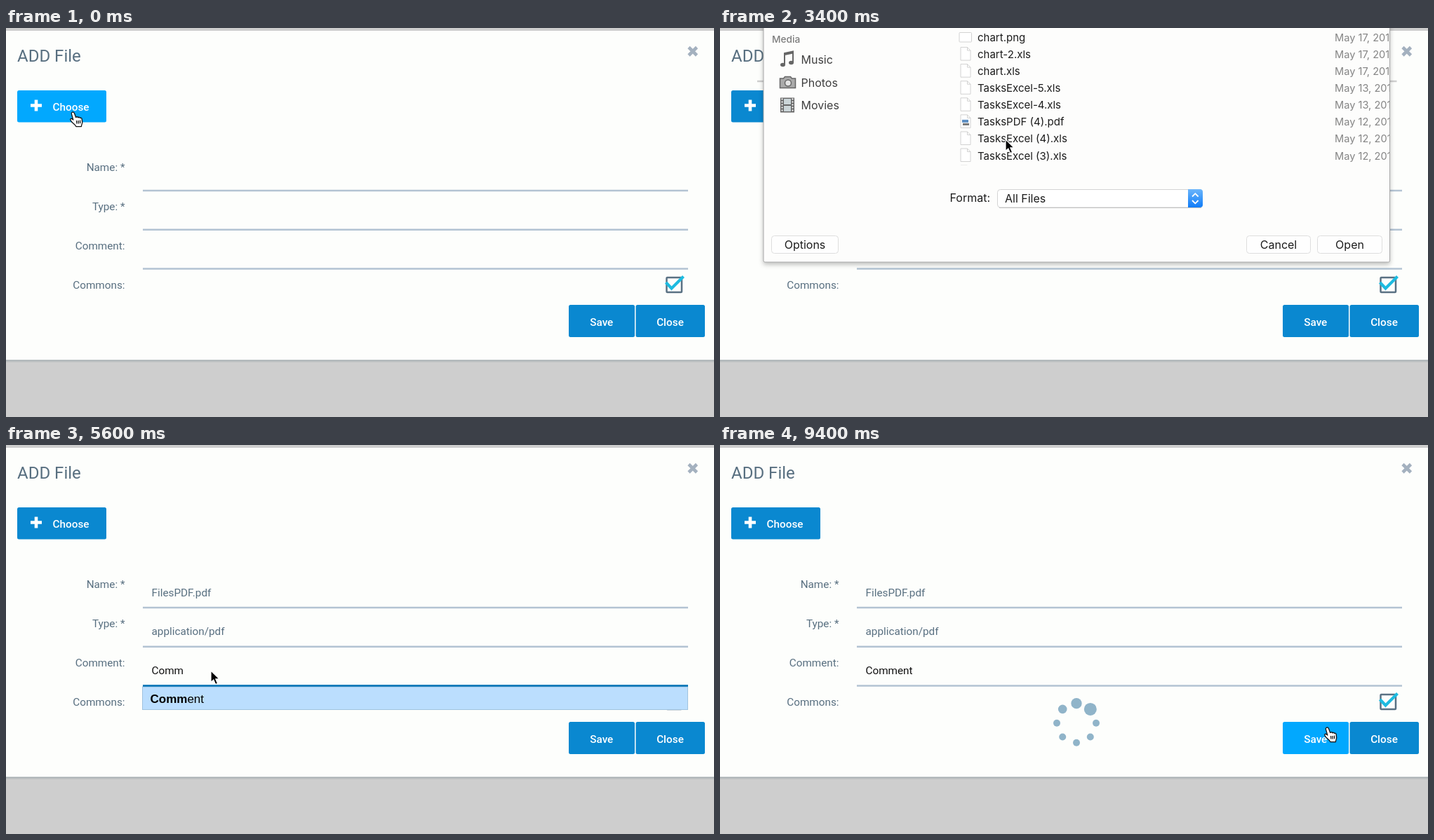
An HTML page for the animation above (9.6 s loop, 1009x555 px).

```html
<!DOCTYPE html>
<html lang="en">
<head>
<meta charset="utf-8">
<title>Add file</title>
<style>
html, body { margin: 0; width: 100%; height: 100%; overflow: hidden; background: #cecece; }
svg { display: block; width: 100%; height: 100%; }
text { white-space: pre; }
.form { font: 15.3px Roboto, sans-serif; fill: #586f80; }
.label { text-anchor: end; }
.btn { font-weight: 500; fill: #fff; text-anchor: middle; }
.line { stroke: #b3c3d3; stroke-width: 2.5; }
.mac { font: 16px Inter, sans-serif; fill: #1c1c1c; }
.side { fill: #3f3f3f; }
.head { font-size: 13.7px; font-weight: 500; fill: #7d7d7d; }
.file { font-size: 15px; }
.date { font-size: 14.6px; fill: #858585; }
.mid { text-anchor: middle; }
.box { fill: #fefefe; stroke: #dedede; }
.ico { fill: none; stroke: #5c5c5c; stroke-width: 1.4; }
.pale { fill: none; stroke: #b4b4b4; stroke-width: 1.6; }
.doc { fill: #fff; stroke: #d2d2d2; }
</style>
</head>
<body>
<svg viewBox="0 0 1009 555" preserveAspectRatio="none">
  <defs>
    <clipPath id="pane"><path d="M62 -20H954.500V551H62z"/></clipPath>
    <clipPath id="rows"><path d="M306 71H954.500V413H306z"/></clipPath>
    <linearGradient id="blue" x2="0" y2="1"><stop stop-color="#6bb5fb"/><stop offset="1" stop-color="#0f7cf8"/></linearGradient>
  </defs>

  <rect width="1009" height="555" fill="#cecece"/>
  <rect y="474" width="1009" height="3" fill="#bfc2c3"/>
  <rect y="4" width="1009" height="470" fill="#fdfefc"/>
  <rect y="473.500" width="1009" height="1.500" fill="#a5adb1"/>

  <g class="form">
    <text x="16" y="48" font-size="24">ADD File</text>
    <path d="M973 27.500L984.500 39M984.500 27.500L973 39" stroke="#a4b1bf" stroke-width="4.600"/>
    <rect id="choose" x="16" y="89" width="127" height="45.500" rx="2.500"/>
    <path d="M35 110.500H51M43 102.500V118.500" stroke="#fff" stroke-width="4.600"/>
    <text class="btn" x="92.500" y="118">Choose</text>
    <g class="label">
      <text x="169.500" y="204">Name: *</text>
      <text x="169.500" y="260">Type: *</text>
      <text x="169.500" y="315.500">Comment:</text>
      <text x="169.500" y="371.500">Commons:</text>
    </g>
    <path class="line" id="nameLine" d="M195 232H972"/>
    <path class="line" id="typeLine" d="M195 287.700H972"/>
    <path class="line" id="noteLine" d="M195 343.500H972"/>
    <text id="name" x="207.500" y="215.500">FilesPDF.pdf</text>
    <text id="type" x="207.500" y="271">application/pdf</text>
    <text id="note" x="207.500" y="327" fill="#111"></text>
    <rect x="941.500" y="356" width="21.500" height="21" fill="none" stroke="#5a7183" stroke-width="2.500" rx="1"/>
    <path d="M940.500 363L948.500 371.500L965.500 354.500" fill="none" stroke="#1dbbe0" stroke-width="4.200"/>
    <rect id="save" x="802" y="395" width="94" height="46" rx="2.500"/>
    <text class="btn" x="848.800" y="424.500">Save</text>
    <rect x="897.500" y="395" width="98.500" height="46" rx="2.500" fill="#0a88d0"/>
    <text class="btn" x="946.500" y="424.500">Close</text>
  </g>

  <g id="hint">
    <rect x="194.500" y="345" width="777" height="32.500" fill="#bbdefe" stroke="#a0c3df"/>
    <path d="M195 343.500H972" stroke="#0b78b8" stroke-width="2.500"/>
    <text x="205.500" y="368" font-family="Liberation Sans, Arial, sans-serif" font-size="17"><tspan id="match" font-weight="700"></tspan><tspan id="rest"></tspan></text>
  </g>

  <g id="spinner" fill="#90b4c9"></g>

  <path id="slot" d="M53 76H964.500" stroke="#cfcfcf" stroke-width="2.500"/>
  <g id="dialog" class="mac">
    <rect x="62" y="-20" width="892.500" height="571" rx="2" fill="#fdfdfc" stroke="#a9a9a9" style="filter: drop-shadow(0 3px 3px rgba(0,0,0,.25))"/>
    <g id="content" clip-path="url(#pane)">
      <g id="bar"></g>
      <path class="ico" d="M89.500 10h18.500v13.500h-18.500zM95 10v13.500M91 13h2.500M91 16h2.500M91 19h2.500"/>
      <path class="pale" d="M155 10.500l-7 6.500l7 6.500M183 10.500l7 6.500l-7 6.500"/>
      <path fill="#5c5c5c" d="M224 10h5v5h-5zM232 10h5v5h-5zM224 18h5v5h-5zM232 18h5v5h-5z"/>
      <rect x="247" y="4" width="34" height="27" fill="#6c6c6c"/>
      <path stroke="#fff" stroke-width="1.500" d="M254.500 11h18M254.500 15h18M254.500 19h18M254.500 23h18"/>
      <path class="ico" d="M287.500 10.500h18.500v12.500h-18.500zM293.500 10.500v12.500M300 10.500v12.500"/>
      <path fill="#5c5c5c" d="M334 10h5v4h-5zM341 10h5v4h-5zM348 10h5v4h-5zM334 15.500h5v3h-5zM341 15.500h5v3h-5zM348 15.500h5v3h-5zM334 20h5v4h-5zM341 20h5v4h-5zM348 20h5v4h-5z"/>
      <path class="ico" d="M358 16l4 4l4-4"/>
      <path d="M396 12q0-2 2-2h5l2 2h9q2 0 2 2v10q0 2-2 2h-16q-2 0-2-2z" fill="#69bdec"/>
      <circle cx="406" cy="19" r="4" fill="#d5effc"/>
      <text class="side" x="421" y="24">Downloads</text>
      <path class="ico" d="M614.500 15l4.500-4.500l4.500 4.500M614.500 20l4.500 4.500l4.500-4.500"/>
      <path class="pale" d="M703 14h-3v12h13v-12h-3M706.500 20v-12M703 11l3.500-3.500l3.500 3.500M763 11.500h13q2 0 2 2v7q0 2-2 2h-13l-5-5.500z"/>
      <circle class="ico" cx="830.500" cy="17" r="5"/>
      <path class="ico" d="M834.500 21l4.500 4.500"/>
      <text x="846" y="24" fill="#b3b3b3">Search</text>
      <path d="M62 41.500H954" stroke="#d4d4d4"/>
      <path d="M306 70.500H954M861.500 44V69" stroke="#dadada"/>
      <text x="314" y="61" font-size="14">Name</text>
      <text x="876" y="61" font-size="14">Date Modified</text>
      <g class="head">
        <text x="74" y="66">Favorites</text>
        <text x="74" y="101.500">Devices</text>
        <text x="74" y="203">Tags</text>
        <text x="74" y="238">Media</text>
      </g>
      <g class="side">
        <text x="115" y="130.500">Gennaro’s Laptop Mini</text>
        <text x="115" y="163.500">Remote Disc</text>
        <text x="115.500" y="267.500">Music</text>
        <text x="115.500" y="300.500">Photos</text>
        <text x="115.500" y="333">Movies</text>
      </g>
      <path d="M88 117.500h17v12h-17z" fill="#cfe0e2" stroke="#686868" stroke-width="1.500"/>
      <path d="M85 131.500H108" stroke="#777" stroke-width="2"/>
      <circle cx="96" cy="157.500" r="10.500" fill="#d8d8d8" stroke="#888"/>
      <circle cx="96" cy="157.500" r="3.500" fill="#fff" stroke="#888"/>
      <path d="M92 269V253l12-2.500v15.500" fill="none" stroke="#666" stroke-width="2"/>
      <path d="M92 254.500l12-2.500" stroke="#666" stroke-width="3"/>
      <ellipse cx="89.500" cy="269.500" rx="3.500" ry="2.800" fill="#666"/>
      <ellipse cx="101.500" cy="266.500" rx="3.500" ry="2.800" fill="#666"/>
      <path d="M85.500 289h5l2-2.500h8l2 2.500h5v13.500h-22z" fill="#aaa" stroke="#666" stroke-width="1.500"/>
      <circle cx="97" cy="295.500" r="4.500" fill="#e4e4e4" stroke="#666" stroke-width="1.500"/>
      <rect x="86" y="316.500" width="20" height="21" fill="#666"/>
      <path d="M91 318h10v8h-10zM91 328h10v8h-10z" fill="#cbd5d8"/>
      <path d="M88.500 317.500v20M103.500 317.500v20" stroke="#fff" stroke-width="2" stroke-dasharray="2 2"/>
      <g id="files" clip-path="url(#rows)"></g>
    </g>
    <text x="327.500" y="465">Format:</text>
    <rect x="395.500" y="447.500" width="292" height="25.500" rx="4" fill="#fff" stroke="#d3d3d3"/>
    <path d="M398 473.500H686" stroke="#c2c2c2"/>
    <text x="406" y="466">All Files</text>
    <path id="stepper" d="M667 447h17q4 0 4 4v18q0 4-4 4h-17z" fill="url(#blue)"/>
    <path id="arrows" d="M673 457.500l4.300-4.300l4.300 4.300M673 463l4.300 4.300l4.300-4.300" fill="none" stroke-width="1.800"/>
    <g id="frames"></g>
    <text class="mid" id="options" x="121" y="532">Options</text>
    <text class="mid" id="cancel" x="796" y="532">Cancel</text>
    <text class="mid" id="open" x="897.500" y="532">Open</text>
  </g>

  <path id="arrow" d="M0 0V16.500L3.800 13L6.600 19.500L9.600 18.200L6.800 11.900L12 11.700z" stroke="#fff" stroke-width="1.200"/>
  <g id="hand" stroke="#111" stroke-width="1.300" stroke-linejoin="round">
    <path fill="#fff" d="M0 1.500c1.500-1.500 3 0 3.600 1.500l2 5.500l1-.6c1.200-.5 2 .2 2.300 1c.6-1 2.300-.8 2.800.6c.8-.7 2.200-.2 2.400 1.200l.6 4.600c.1 1.600-.4 3-1 4.200l-.3 2l-7.400.2c-1-2.200-3-3.600-5-5.400c-1.600-1.400-2.600-3-3.200-4.400c-.5-1.200 1-2 2-1.400l2 1.600L-.6 3.600c-.3-.9 0-1.700.6-2.100z"/>
    <path fill="none" d="M6.500 13l.4 4.500M9 13l.3 4.500M11.500 12.600l.2 4.500"/>
  </g>
</svg>
<script>
const LOOP = 9600, STEP = 200, WORD = "Comment";
const $ = id => document.getElementById(id);
const show = (id, on) => $(id).style.display = on ? "" : "none";
const paint = (id, fill) => $(id).style.fill = fill;
const move = (id, x, y) => $(id).setAttribute("transform", `translate(${x} ${y})`);
const box = (x, y, w, h) => `<rect class="box" x="${x + .5}" y="${y + .5}" width="${w}" height="${h}" rx="4"/>`;

const DIALOG = [[1000, -560], [1600, 0], [3200, 0], [3800, -651]];
const CURSOR = [[0, 94, 119], [200, 86, 110], [1400, 86, 110], [1800, 330, 190], [2200, 407, 207],
  [2400, 407, 207], [2800, 407, 159], [3600, 407, 159], [4000, 385, 212], [4200, 360, 272],
  [4400, 326, 379], [5000, 292, 322], [6000, 292, 322], [6600, 284, 360], [7000, 284, 360],
  [8000, 866, 408], [9000, 866, 408], [9400, 864, 402]];

// Linear value of a keyed track at time t
function track(keys, t, k = 1) {
  if (t <= keys[0][0]) return keys[0][k];
  for (let i = 1; i < keys.length; i++) {
    const a = keys[i - 1], b = keys[i];
    if (t <= b[0]) return a[k] + (b[k] - a[k]) * (t - a[0]) / (b[0] - a[0]);
  }
  return keys[keys.length - 1][k];
}

const FILES = ["ProjectUsersPDF.pdf", "ContractsPDF.pdf", "TasksPDF (6).pdf", "FilesPDF.pdf",
  "TasksPDF (5).pdf", "chart.svg", "chart.png", "chart-2.xls", "chart.xls", "TasksExcel-5.xls",
  "TasksExcel-4.xls", "TasksPDF (4).pdf", "TasksExcel (4).xls", "TasksExcel (3).xls", ""];

function icon(name, y) {
  if (name.endsWith("png")) return `<rect class="doc" x="341" y="${y - 7}" width="17.500" height="13.500" rx="1"/>`;
  let s = `<path class="doc" d="M343 ${y - 10}h9.500l4.500 4.500v14h-14zM352.500 ${y - 10}v4.500h4.500"/>`;
  if (name.endsWith("pdf")) s += `<rect x="345" y="${y - 3}" width="9" height="4" fill="#5d8fc4"/><rect x="346" y="${y + 2}" width="9" height="3" fill="#777"/>`;
  if (name.endsWith("svg")) s += `<circle cx="349.500" cy="${y + 1}" r="4.500" fill="#2f8fdc"/>`;
  return s;
}

$("files").innerHTML = `<rect id="pick" x="306" y="146" width="649" height="24" fill="#0b62d9"/>` +
  FILES.map((name, i) => {
    const y = 86 + 24.08 * i;
    const date = i < 5 ? "Yesterday, 5:20 PM" : `May ${i < 9 ? 17 : i < 11 ? 13 : 12}, 2017`;
    return `<g id="row${i}">${icon(name, y)}<text class="file" x="367" y="${y + 5.5}">${name}</text>` +
      `<text class="date" x="876" y="${y + 5.5}">${date}</text></g>`;
  }).join("");

$("bar").innerHTML = [[73, 51], [136, 33], [169, 33], [214, 97], [324, 50], [387, 241], [681, 49], [743, 48], [802, 142]]
  .map(([x, w]) => box(x, 4, w, 26)).join("");
$("frames").innerHTML = [[73, 95], [750, 91], [851, 92]].map(([x, w]) => box(x, 513, w, 25)).join("");

function spin(t) {
  const head = 1 + (t - 9400) / 125;
  $("spinner").innerHTML = [...Array(8).keys()].map(i => {
    const age = ((head - i) % 8 + 8) % 8, a = i * Math.PI / 4;
    const r = Math.max(5, 9 - 1.35 * Math.min(age, (8 - age) * 4));
    return `<circle cx="${508 + 28 * Math.sin(a)}" cy="${396.7 - 28 * Math.cos(a)}" r="${r}"/>`;
  }).join("");
}

function render(t) {
  const within = (a, b) => t >= a && t < b;

  // Form
  paint("choose", t < 800 ? "#02a8fe" : t < 1800 ? "#1171b0" : "#0a88d0");
  paint("save", t >= 8000 ? "#02a8fe" : "#0a88d0");
  show("name", t >= 3800);
  show("type", t >= 3800);
  const hover = t === 4200 ? 2 : t === 4400 ? 1 : 0;
  $("typeLine").style.stroke = ["#b3c3d3", "#7fb5da", "#0b78b8"][hover];
  paint("type", ["#586f80", "#35709b", "#0b6da8"][hover]);
  $("nameLine").style.stroke = t === 4000 ? "#0b78b8" : "#b3c3d3";
  $("noteLine").style.stroke = within(5000, 8400) ? "#0b78b8" : "#b3c3d3";
  const typed = Math.max(0, Math.min(7, (t - 5200) / 100));
  $("note").textContent = WORD.slice(0, typed);
  $("match").textContent = WORD.slice(0, typed);
  $("rest").textContent = WORD.slice(typed);
  show("hint", within(5600, 7000));
  show("spinner", t >= 8600);
  spin(t);

  // File dialog
  const ready = t >= 1800, picked = t >= 2800;
  show("dialog", within(1000, 3800));
  show("slot", within(1000, 3800));
  move("dialog", 0, track(DIALOG, t));
  for (const id of ["content", "frames", "stepper"]) show(id, ready);
  $("arrows").style.stroke = ready ? "#fff" : "#333";
  paint("options", ready ? "#1c1c1c" : "#b2b2b2");
  paint("cancel", ready ? "#1c1c1c" : "#b2b2b2");
  paint("open", picked ? "#1c1c1c" : ready ? "#b2b2b2" : "#d8d8d8");
  show("pick", picked);
  for (const el of $("row3").querySelectorAll("text")) el.style.fill = picked ? "#fff" : "";

  // Pointer
  const hand = t < 1600 || t >= 8000;
  show("hand", hand);
  show("arrow", !hand);
  move(hand ? "hand" : "arrow", track(CURSOR, t), track(CURSOR, t, 2));
}

let start, last = -1;
function tick(now) {
  start ??= now;
  const t = Math.floor((now - start) % LOOP / STEP) * STEP;
  if (t !== last) render(last = t);
  requestAnimationFrame(tick);
}
render(0);
requestAnimationFrame(tick);
</script>
</body>
</html>
```
